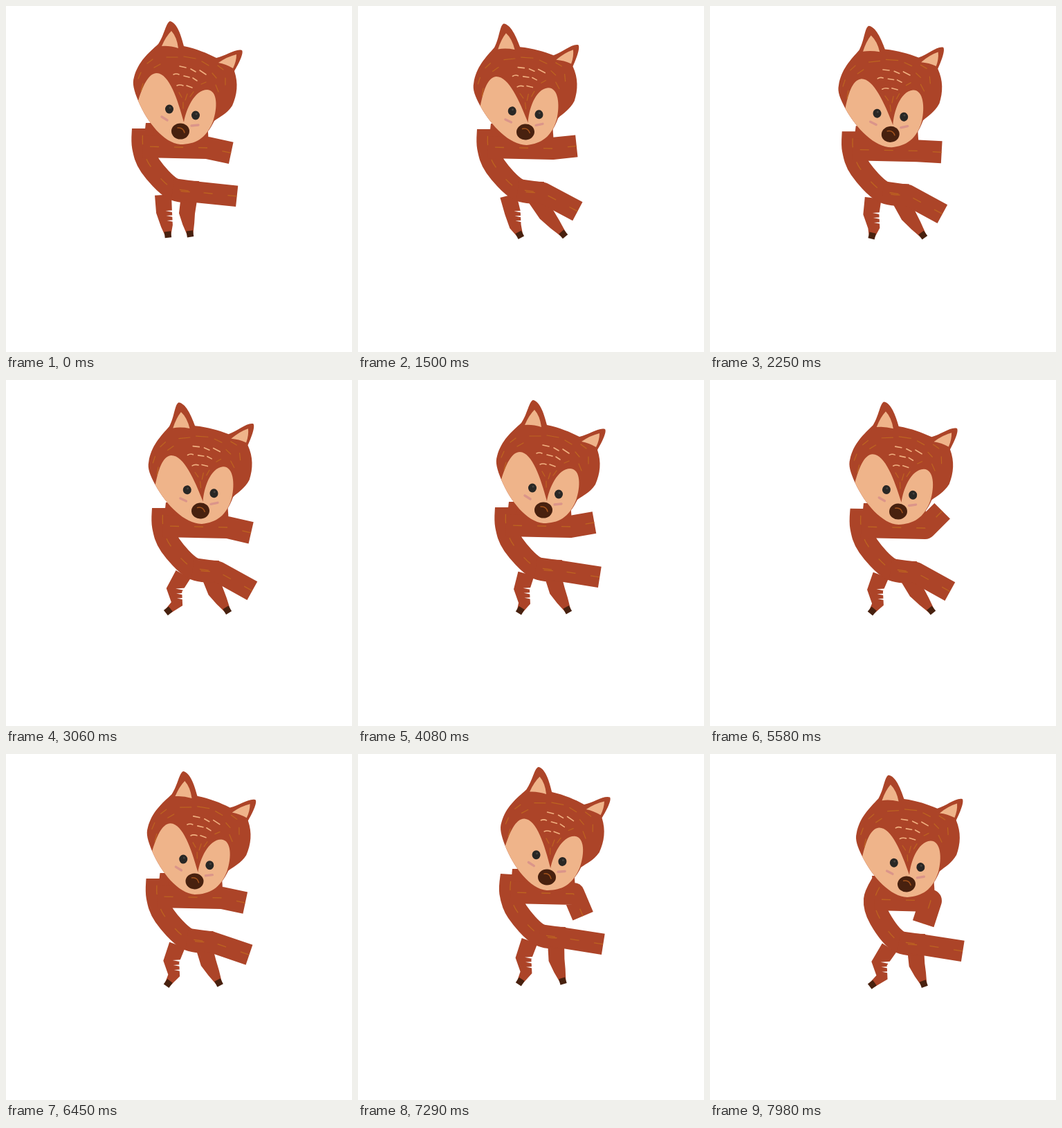
An HTML page with a canvas for the animation above (8000 ms loop, 500 by 500 pixels).

```html
<!DOCTYPE html>
<html lang="en">
<head>
<meta charset="utf-8">
<title>Dancing fox</title>
<style>
  html, body { margin: 0; height: 100%; overflow: hidden; background: #fff; }
  canvas { display: block; width: 100vw; height: 100vh; }
</style>
</head>
<body>
<canvas id="stage" width="500" height="500"></canvas>
<script>
const ctx = document.getElementById('stage').getContext('2d');
const LOOP = 8000;
const FUR = '#ac4428', PEACH = '#efb48a', DARK = '#48210f', MARK = '#bd6420';

// The dance: time, nose x y, head tilt, forearm angle, lower arm angle, right toe x.
// The rest of the body hangs from the nose.
const DANCE = [
  [0,    252, 181, 13, 12, 6,  266],
  [1500, 242, 182, 7, -6, 28,  297],
  [3060, 281, 189, 7, 13, 29,  320],
  [3300, 294, 188, 8, 10, 26,  318],
  [3680, 236, 185, 11, 0, 18,  310],
  [4080, 268, 188, 13, -10, 9, 303],
  [5580, 272, 190, 11, -45, 29, 320],
  [7290, 273, 178, 14, 67, 9,  296],
  [7980, 284, 188, 9, 108, 9,  309]
];

const HEAD = new Path2D('M191 137C185 122 182 112 185 103C191 80 206 68 220 55C229 42 231 24 237 22C247 24 253 42 257 58C276 62 290 68 304 75C318 72 332 61 341 64C344 68 336 84 330 94C336 112 334 128 327 144C319 156 309 160 301 166C288 193 272 200 252 200C228 198 204 168 191 137Z');
const FACE = new Path2D('M191 137C197 118 205 97 218 97C236 98 248 135 257 168C260 150 272 121 291 121C306 122 306 147 299 167C289 192 273 200 252 200C228 198 204 168 191 137Z');
const EARS = new Path2D('M239 36Q231 44 225 58Q236 57 249 61Q247 45 239 36ZM333 70Q320 73 307 82Q318 84 328 90Q333 80 333 70Z');
const HAIR = new Path2D('M232 74h16M257 73l17 3M283 80l10 6M298 97l6 7M204 83l8-6M191 105l4-9M195 123l3-11M214 89l9-5M303 114l4 10M317 104v10M306 86l8 6M250 125l4 7M262 127l-3 9M271 124l-5 7M256 139v9M282 113l7-3');
const SHINE = new Path2D('M251 87l9 2M267 91l7 4M280 93l9 6M242 99q4-2 8 0M257 101l8 2M270 104l6 4M247 115q4-2 9 0M261 115l8 3');
const CHEEKS = new Path2D('M225 160l8 5M268 173l10-1');

function poseAt(time) {
  const next = Math.max(1, DANCE.findIndex(row => row[0] > time));
  const i = time < DANCE.at(-1)[0] ? next : DANCE.length - 1;
  const a = DANCE[i - 1], b = DANCE[i];
  const u = Math.min(1, (time - a[0]) / (b[0] - a[0]));
  return a.map((v, k) => v + (b[k] - v) * u).slice(1);
}

const polar = ([x, y], length, degrees) => {
  const a = degrees * Math.PI / 180;
  return [x + length * Math.cos(a), y + length * Math.sin(a)];
};
const direction = (a, b) => Math.atan2(b[1] - a[1], b[0] - a[0]) * 180 / Math.PI;
const mix = (a, b, u, dx = 0, dy = 0) =>
  [a[0] + (b[0] - a[0]) * u + dx, a[1] + (b[1] - a[1]) * u + dy];

function line(points) {
  const path = new Path2D();
  points.forEach(p => path.lineTo(...p));
  return path;
}

// Smooth curve through all points.
function curve(points) {
  const path = new Path2D();
  path.moveTo(...points[0]);
  for (let i = 0; i < points.length - 1; i++) {
    const a = points[i], b = points[i + 1];
    const before = points[i - 1] || a, after = points[i + 2] || b;
    path.bezierCurveTo(
      a[0] + (b[0] - before[0]) / 6, a[1] + (b[1] - before[1]) / 6,
      b[0] - (after[0] - a[0]) / 6, b[1] - (after[1] - a[1]) / 6, ...b);
  }
  return path;
}

function fill(path, color) {
  ctx.fillStyle = color;
  ctx.fill(path);
}

function stroke(path, color, width, dash = []) {
  ctx.strokeStyle = color;
  ctx.lineWidth = width;
  ctx.setLineDash(dash);
  ctx.stroke(path);
}

function ellipse(x, y, rx, ry, color) {
  const path = new Path2D();
  path.ellipse(x, y, rx, ry, 0, 0, 7);
  fill(path, color);
}

function leg(points) {
  const widths = [12, 11.5, 8.5, 4.5];
  const left = [], right = [];
  points.forEach((p, i) => {
    const angle = direction(points[Math.max(0, i - 1)], points[Math.min(3, i + 1)]);
    left.push(polar(p, widths[i], angle + 90));
    right.unshift(polar(p, widths[i], angle - 90));
  });
  fill(line([...left, ...right]), FUR);
  const [ankle, toe] = points.slice(2);
  const angle = direction(ankle, toe);
  stroke(line([polar(toe, -5, angle), polar(toe, 4, angle)]), DARK, 9.5);
}

function drawLegs(hip, ground, toeX) {
  const leftHip = mix(hip, hip, 0, -14, 9), leftToe = [234, ground];
  const leftKnee = mix(leftHip, leftToe, 0.5, -2, -4);
  leg([leftHip, leftKnee, mix(leftKnee, leftKnee, 0, 4, 20), leftToe]);
  for (let i = 0; i < 3; i++) {
    const x = leftKnee[0] + 2 + i, y = leftKnee[1] - 2 + i * 7;
    fill(line([[x, y], [x + 15, y - 1], [x + 15, y + 3]]), '#fff');
  }
  const rightHip = mix(hip, hip, 0, 24, 10), rightToe = [toeX, ground - 1];
  const rightKnee = mix(rightHip, rightToe, 0.5, -4, -2);
  leg([rightHip, rightKnee, mix(rightKnee, rightToe, 0.5), rightToe]);
}

function drawHead(nose, tilt) {
  ctx.save();
  ctx.translate(...nose);
  ctx.rotate((tilt - 13) * Math.PI / 180);
  ctx.translate(-252, -181);
  fill(HEAD, FUR);
  fill(FACE, PEACH);
  fill(EARS, PEACH);
  ctx.lineCap = 'round';
  stroke(HAIR, MARK, 1.2);
  stroke(SHINE, '#f0b080', 1.6);
  stroke(CHEEKS, '#db958a', 3.4);
  for (const [x, y] of [[236, 149], [274, 158]]) {
    ellipse(x, y, 6, 6.5, '#292725');
    ellipse(x + 1, y - 2, 1.5, 1.5, '#45423f');
  }
  ellipse(252, 181, 13, 11.5, DARK);
  stroke(new Path2D('M248 176q8-1 10 7'), '#a4531c', 1.5);
  ctx.restore();
}

function draw(time) {
  const [x, y, tilt, armAngle, lowAngle, toeX] = poseAt(time);
  const at = (dx, dy) => [x + dx, y + dy];
  const tuck = 8 * (armAngle / 108) ** 4; // a folded arm pulls the shoulder in

  const chest = at(tuck - 54, 22), shoulder = at(tuck * 2.5 - 54, -4);
  const hip = at(-11, 83), belly = mix(chest, hip, 0.36, -5, 6);
  const lowElbow = mix(hip, hip, 0, 36, 5), elbow = at(39 - tuck / 2, 24);
  const torso = curve([shoulder, chest, belly, hip, lowElbow]);
  const lowArm = line([hip, lowElbow, polar(lowElbow, 57, lowAngle)]);
  const arm = line([chest, elbow, polar(elbow, 35, armAngle)]);
  const neck = line([at(-50, -12), at(39, -12), at(41, 17), elbow, chest]);

  ctx.fillStyle = '#fff';
  ctx.fillRect(0, 0, 500, 500);
  ctx.lineJoin = 'round';

  drawLegs(hip, 332 + (y - 184) * 0.4, toeX);
  fill(neck, FUR);
  stroke(torso, FUR, 32);
  stroke(lowArm, FUR, 30.5);
  stroke(arm, FUR, 32);
  for (const limb of [torso, lowArm, arm]) stroke(limb, MARK, 1.3, [0, 10, 13, 12]);
  drawHead([x, y], tilt);
}

function frame() {
  draw(Math.floor(performance.now() % LOOP / 30) * 30);
  requestAnimationFrame(frame);
}
frame();
</script>
</body>
</html>
```
